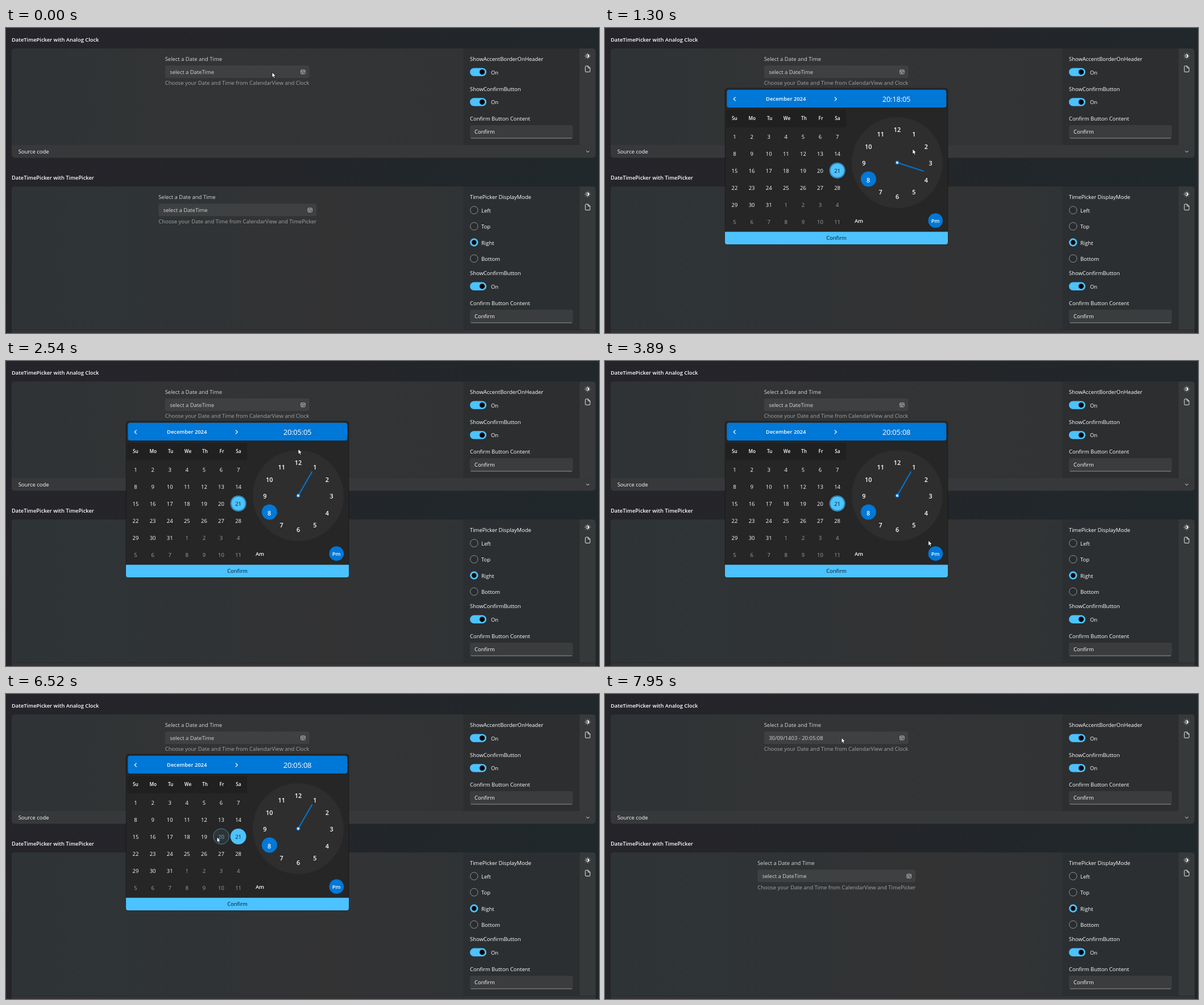
An HTML page that plays this animation: 1043x537 px, repeating every 8000 ms.

```html
<!DOCTYPE html>
<html lang="en">
<head>
<meta charset="utf-8">
<title>DateTimePicker</title>
<style>
html, body { margin: 0; width: 100%; height: 100%; overflow: hidden; background: #22262a; }
svg { display: block; width: 1043px; height: 537px; }
text { font-family: "Open Sans", "Noto Sans", sans-serif; font-variant-ligatures: none; white-space: pre; }
</style>
</head>
<body>
<svg id="stage" viewBox="0 0 1043 537" xmlns="http://www.w3.org/2000/svg">
  <defs>
    <linearGradient id="page" x1="0" y1="0" x2="1" y2="0.35">
      <stop offset="0" stop-color="#25242a"/><stop offset="0.5" stop-color="#242529"/><stop offset="1" stop-color="#20282b"/>
    </linearGradient>
    <linearGradient id="upper">
      <stop offset="0" stop-color="#2f3335"/><stop offset="0.5" stop-color="#333435"/><stop offset="1" stop-color="#323334"/>
    </linearGradient>
    <linearGradient id="lower">
      <stop offset="0" stop-color="#2e3436"/><stop offset="0.45" stop-color="#303335"/><stop offset="0.7" stop-color="#333334"/><stop offset="1" stop-color="#303335"/>
    </linearGradient>
    <clipPath id="card1"><rect x="10" y="36" width="1027" height="192.5" rx="5"/></clipPath>
    <clipPath id="card2"><rect x="10" y="279" width="1027" height="300" rx="5"/></clipPath>
  </defs>
</svg>
<script>
const NS = 'http://www.w3.org/2000/svg';
const stage = document.getElementById('stage');
const ACCENT = '#4cc2ff', BLUE = '#0078d7', SIZE = 9.45;

function add(parent, tag, attrs) {
  const node = document.createElementNS(NS, tag);
  for (const k in attrs) node.setAttribute(k, attrs[k]);
  parent.appendChild(node);
  return node;
}
const group = (parent, attrs = {}) => add(parent, 'g', attrs);
const rect = (p, x, y, width, height, fill, more = {}) => add(p, 'rect', { x, y, width, height, fill, ...more });
const circle = (p, cx, cy, r, fill, more = {}) => add(p, 'circle', { cx, cy, r, fill, ...more });
const line = (p, d, stroke, w = 1) => add(p, 'path', {
  d, stroke, 'stroke-width': w, fill: 'none', 'stroke-linecap': 'round', 'stroke-linejoin': 'round'
});
// y is the middle of the capitals
function label(p, str, x, y, { size = SIZE, fill = '#fff', weight = 400, anchor = 'start', gap = 0 } = {}) {
  const node = add(p, 'text', {
    x, y: y + size * 0.357, 'font-size': size, fill, 'font-weight': weight, 'text-anchor': anchor, 'letter-spacing': gap
  });
  node.textContent = str;
  return node;
}
const mid = (p, str, x, y, opt = {}) => label(p, str, x, y, { anchor: 'middle', ...opt });
const show = (node, on) => node.setAttribute('display', on ? 'inline' : 'none');

function toggle(y) {
  rect(stage, 816, y - 7.2, 29, 14.4, ACCENT, { rx: 7.2 });
  circle(stage, 837.5, y, 4.6, '#000');
  label(stage, 'On', 853, y + 0.7);
}
function textBox(y) {
  rect(stage, 816, y, 181, 23.5, '#3a3c3d', { rx: 3 });
  line(stage, `M818 ${y + 23}H995`, '#999b9c', 0.9);
  label(stage, 'Confirm', 824, y + 11.3);
}
function radio(y, name, on) {
  if (on) {
    circle(stage, 823.3, y - 0.5, 7.2, ACCENT);
    circle(stage, 823.3, y - 0.5, 4.2, '#000');
  } else {
    circle(stage, 823.3, y - 0.5, 6.7, '#292c2e', { stroke: '#9c9e9f', 'stroke-width': 0.9 });
  }
  label(stage, name, 836, y + 0.4);
}
function sideIcons(y) {
  const g = group(stage, { transform: `translate(1023 ${y})` });
  circle(g, 0, 0, 2.7, 'none', { stroke: '#fff', 'stroke-width': 0.9 });
  add(g, 'path', { d: 'M0-2.7A2.7 2.7 0 0 1 0 2.7Z', fill: '#fff' });
  for (let i = 0; i < 8; i++) {
    add(g, 'path', { d: 'M0-4.3V-5.3', stroke: '#fff', 'stroke-width': 0.9, transform: `rotate(${i * 45})` });
  }
  line(g, 'M-4 18.6q0-1 1-1H0.8L4.2 21V27q0 1-1 1H-3q-1 0-1-1ZM0.8 17.8V21H4', '#fff', 0.9);
}
function picker(x, y, w, hint) {
  label(stage, 'Select a Date and Time', x, y, { fill: '#d6d7d7' });
  rect(stage, x, y + 11.5, w, 22, '#3e4041', { rx: 3 });
  const text = label(stage, 'select a DateTime', x + 8.5, y + 22.7, { fill: '#d6d7d7' });
  const ix = x + w - 15, iy = y + 19.3;
  rect(stage, ix, iy, 7.4, 7, 'none', { rx: 1.3, stroke: '#c8c9c9', 'stroke-width': 0.9 });
  line(stage, `M${ix} ${iy + 2.2}h7.4M${ix + 2} ${iy + 4}h3.4M${ix + 2} ${iy + 5.4}h2`, '#c8c9c9', 0.8);
  label(stage, hint, x, y + 42.4, { fill: '#a3a5a6' });
  return text;
}

// page
rect(stage, 0, 0, 1043, 537, 'url(#page)');
label(stage, 'DateTimePicker with Analog Clock', 10, 20.2, { weight: 600, size: 9.35 });
label(stage, 'DateTimePicker with TimePicker', 10, 263.5, { weight: 600, size: 9.3 });

const c1 = group(stage, { 'clip-path': 'url(#card1)' });
rect(c1, 10, 36, 794, 170, 'url(#upper)');
rect(c1, 804, 36, 205, 170, '#2c2e30');
rect(c1, 1009, 36, 28, 170, '#37393a');
rect(c1, 10, 206, 1027, 23, '#36383a');
const c2 = group(stage, { 'clip-path': 'url(#card2)' });
rect(c2, 10, 279, 794, 252, 'url(#lower)');
rect(c2, 804, 279, 205, 252, '#2b2f31');
rect(c2, 1009, 279, 28, 252, '#36393a');
rect(c2, 10, 531, 1027, 6, '#343436');
line(c2, 'M10 531.3H1037', '#28292b', 0.8);

const field = picker(279.7, 54.5, 254, 'Choose your Date and Time from CalendarView and Clock');
picker(268.2, 297.8, 277.8, 'Choose your Date and Time from CalendarView and TimePicker');
label(stage, 'Source code', 21.7, 218);
line(stage, 'M1020.8 216.5l2.4 2.3 2.4-2.3', '#fff', 0.9);

label(stage, 'ShowAccentBorderOnHeader', 816, 54.5);
toggle(77.6);
label(stage, 'ShowConfirmButton', 816, 107.3);
toggle(130.4);
label(stage, 'Confirm Button Content', 816, 159.5);
textBox(171);
label(stage, 'TimePicker DisplayMode', 816, 297.8);
['Left', 'Top', 'Right', 'Bottom'].forEach((name, i) => radio(321.2 + i * 28.4, name, i === 2));
label(stage, 'ShowConfirmButton', 816, 432);
toggle(454.8);
label(stage, 'Confirm Button Content', 816, 484.5);
textBox(496);
sideIcons(49.3);
sideIcons(292.6);

// popup
const popup = group(stage);
rect(popup, 210.5, 106, 393, 276, '#000', { rx: 5, opacity: 0.25 });
rect(popup, 211.5, 106, 391, 274.5, '#262626', { rx: 4, stroke: '#1d1d1d', 'stroke-width': 0.8 });
rect(popup, 214.3, 108.7, 386, 31.2, BLUE, { rx: 4 });
rect(popup, 213, 144, 211, 31, '#202020');
line(popup, 'M229.3 121.8l-3 3.2 3 3.2M404.2 121.8l3 3.2-3 3.2', '#fff', 1.1);
mid(popup, 'December 2024', 318.2, 125, { weight: 600, size: 9.35 });
const clockText = mid(popup, '', 512.5, 125, { size: 13, gap: -0.25 });

const dayX = i => 228 + 30.1 * i, dayY = j => 191.3 + 30.1 * j;
['Su', 'Mo', 'Tu', 'We', 'Th', 'Fr', 'Sa'].forEach((d, i) =>
  mid(popup, d, 227.8 + 30.17 * i + 1.7 * Math.sin(Math.PI * i / 6), 159.3, { size: 8.2, weight: 600 }));
circle(popup, 408.6, 250.8, 13.9, ACCENT);
const todayRing = circle(popup, 408.6, 250.8, 12.8, 'none', { stroke: '#20506a', 'stroke-width': 0.9 });
const pickRing = circle(popup, 378.5, 250.8, 13.8, '#303334', { stroke: '#3c93c0', 'stroke-width': 0.9 });
const days = [];
for (let n = 0; n < 42; n++) {
  const fill = n === 20 ? '#06202e' : n < 31 ? '#fff' : '#a0a0a0';
  days.push(mid(popup, n % 31 + 1, dayX(n % 7), dayY(Math.floor(n / 7)), { fill }));
}

circle(popup, 514, 237, 80, '#2e2e2e');
circle(popup, 463.4, 265.9, 13.5, BLUE);
for (let h = 1; h <= 12; h++) {
  const a = h * Math.PI / 6;
  mid(popup, h, 514 + 58.7 * Math.sin(a), 238.3 - 58.7 * Math.cos(a), { size: 10.8, weight: 600 });
}
const hand = add(popup, 'path', { d: 'M514 237V188', stroke: BLUE, 'stroke-width': 2 });
circle(popup, 514, 237, 2.7, '#fff', { stroke: BLUE, 'stroke-width': 1.6 });
const halfDot = circle(popup, 581, 339, 12.8, BLUE);
mid(popup, 'Am', 446.5, 339.8, { weight: 600, size: 9.4 });
mid(popup, 'Pm', 581.2, 339.8, { weight: 600, size: 9.4 });
add(popup, 'path', { d: 'M211 358.8H603V377q0 4-4 4H215q-4 0-4-4Z', fill: ACCENT });
mid(popup, 'Confirm', 407, 370, { fill: '#06141c' });

// pointer
const press = circle(stage, 0, 0, 9, '#ff0', { 'fill-opacity': 0.47 });
const pointer = add(stage, 'path', {
  d: 'M0 0V9.2L2.1 7.2 3.5 10.4 5.1 9.7 3.8 6.6H6.7Z',
  fill: '#fff', stroke: '#000', 'stroke-width': 0.7, 'stroke-linejoin': 'round'
});

const path = [
  [0, 468, 78], [860, 468, 78], [1300, 541, 213], [1650, 531, 205], [1730, 530, 204],
  [2470, 514, 155], [2560, 514, 155], [3080, 523, 179], [3300, 523, 179], [4100, 578, 344],
  [4170, 578, 344], [4650, 452, 342], [5060, 452, 341], [5130, 459, 343], [5400, 579, 344],
  [5700, 579, 344], [6320, 371, 252], [6560, 371, 252], [7210, 621, 84], [7290, 624, 82],
  [7400, 624, 82], [7940, 416, 77]
];
const clicks = [70, 4650, 5600, 6450, 7350];

function place(t) {
  const i = path.findIndex(p => p[0] > t);
  if (i < 0) return path[path.length - 1].slice(1);
  const [t0, x0, y0] = path[i - 1], [t1, x1, y1] = path[i];
  const u = (t - t0) / (t1 - t0), e = u * u * (3 - 2 * u);
  return [x0 + (x1 - x0) * e, y0 + (y1 - y0) * e];
}
function minute(t) {
  if (t < 1340) return 18;
  if (t < 1650) return Math.round(18 - 15 * (t - 1340) / 310);
  return t < 1800 ? 3 : t < 1940 ? 4 : 5;
}
const second = t => t < 2680 ? 5 : t < 2820 ? 6 : t < 3400 ? 7 : 8;
const pad = n => String(n).padStart(2, '0');

function draw(t) {
  const [x, y] = place(t);
  const at = `translate(${x} ${y})`;
  pointer.setAttribute('transform', at);
  press.setAttribute('transform', at);
  show(press, clicks.some(c => t >= c && t < c + 68));

  const closed = t >= 7420;
  show(popup, t >= 420 && !closed);
  const lift = t < 480 ? -2 : t < 620 ? -1 : 0;
  popup.setAttribute('transform', `translate(0 ${lift})`);

  const am = t >= 4720 && t < 5670;
  halfDot.setAttribute('cx', am ? 446.5 : 581.3);
  const m = minute(t);
  hand.setAttribute('transform', `rotate(${m * 6} 514 237)`);
  clockText.textContent = `${am ? '08' : '20'}:${pad(m)}:${pad(second(t))}`;

  const picked = t >= 6450;
  show(todayRing, !picked);
  show(pickRing, picked);
  pickRing.setAttribute('fill', t < 6740 ? '#303334' : '#262626');
  days[19].setAttribute('fill', picked ? ACCENT : '#fff');
  field.textContent = closed ? '30/09/1403 - 20:05:08' : 'select a DateTime';
}

const start = performance.now();
function tick() {
  draw((performance.now() - start) % 8000);
  requestAnimationFrame(tick);
}
tick();
</script>
</body>
</html>
```
